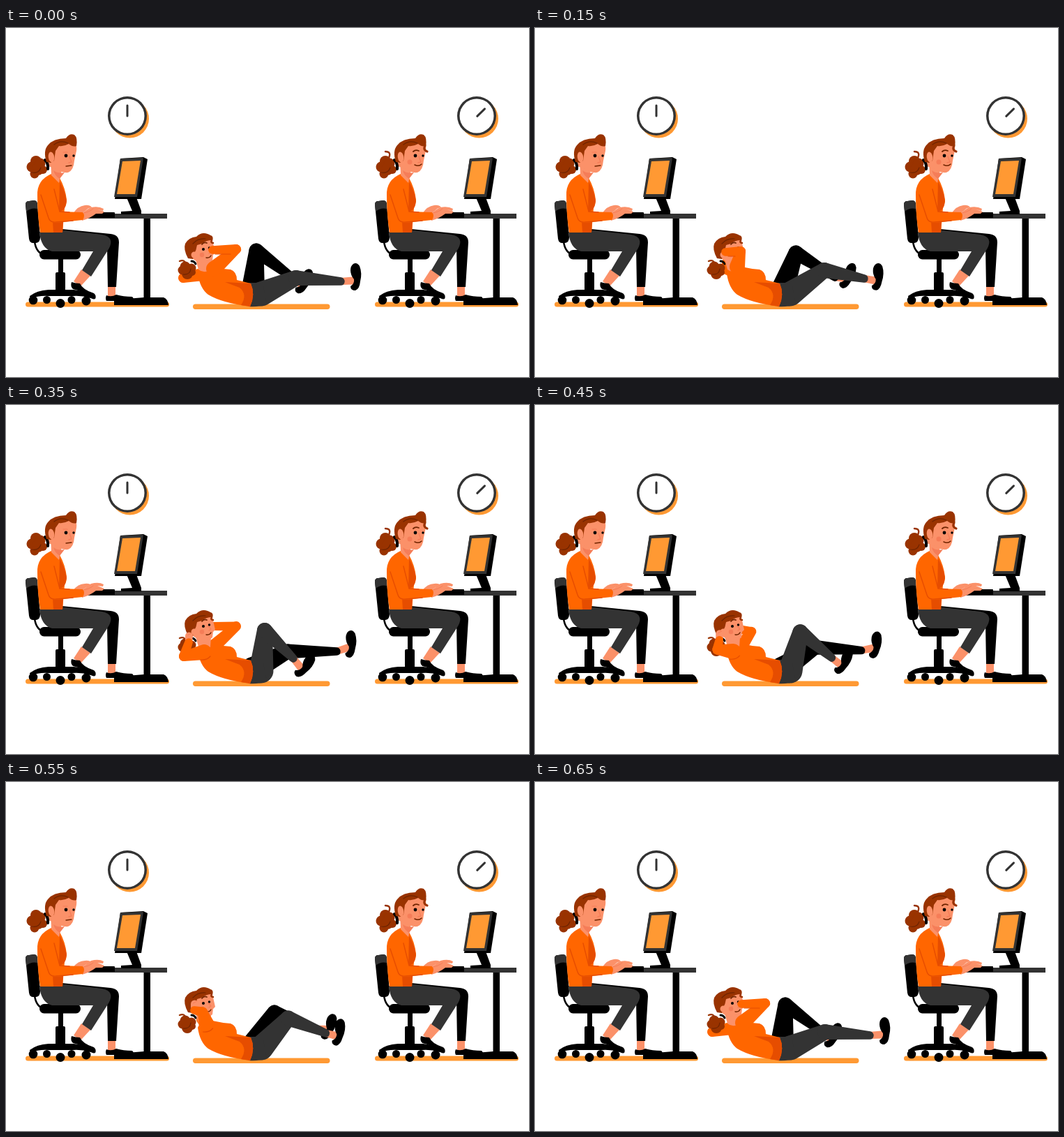
An HTML page with a canvas for the animation above (0.7 s loop, 750 by 500 pixels).

```html
<!DOCTYPE html>
<html lang="en">
<head>
<meta charset="utf-8">
<title>Desk and floor workout</title>
<style>
html, body { margin: 0; width: 100%; height: 100%; overflow: hidden; background: #fff; }
canvas { display: block; }
</style>
</head>
<body>
<canvas id="stage" width="750" height="500"></canvas>
<script>
const ctx = document.getElementById('stage').getContext('2d');
const C = {
  black: '#000', grey: '#333', sun: '#ff9933', top: '#ff6600', shade: '#e64d00',
  skin: '#fb9169', blush: '#f57d58', hair: '#993300', dark: '#6f2400'
};
const LOOP = 700, STEP = 50;

function fill(color, d) {
  ctx.fillStyle = color;
  ctx.fill(new Path2D(d));
}
function line(color, width, d) {
  ctx.strokeStyle = color;
  ctx.lineWidth = width;
  ctx.lineCap = ctx.lineJoin = 'round';
  ctx.stroke(new Path2D(d));
}
function dots(color, list) {
  ctx.fillStyle = color;
  for (const [x, y, r] of list) {
    ctx.beginPath();
    ctx.arc(x, y, r, 0, Math.PI * 2);
    ctx.fill();
  }
}
function bar(color, x, y, w, h, r = 0) {
  ctx.fillStyle = color;
  ctx.beginPath();
  ctx.roundRect(x, y, w, h, r);
  ctx.fill();
}
// tapered capsule between two circles
function limb(color, [ax, ay], ra, [bx, by], rb) {
  const d = Math.hypot(bx - ax, by - ay);
  const ang = Math.atan2(by - ay, bx - ax);
  ctx.fillStyle = color;
  ctx.beginPath();
  if (d <= Math.abs(ra - rb)) {
    ctx.arc(ax, ay, Math.max(ra, rb), 0, Math.PI * 2);
  } else {
    const o = Math.acos((ra - rb) / d);
    ctx.arc(ax, ay, ra, ang + o, ang - o + Math.PI * 2);
    ctx.arc(bx, by, rb, ang - o, ang + o);
  }
  ctx.fill();
}

function clock(angle) {
  dots(C.sun, [[177.5, 130, 27.5]]);
  dots(C.grey, [[174, 126, 28]]);
  dots('#fff', [[174, 126, 24.5]]);
  ctx.save();
  ctx.translate(174, 127);
  ctx.rotate(angle);
  line(C.grey, 3, 'M0 -1V-16');
  ctx.restore();
}

function chair() {
  fill(C.black, 'M28 253Q28 248 33 248L40 247Q45 247 45 253L49 300Q49 307 43 308L39 308Q34 308 33 302Z');
  fill(C.grey, 'M28 253Q28 248 33 248L40 247Q45 247 45 253L45 259Q36 257 29 263Z');
  line(C.black, 2.5, 'M41 306Q43 322 56 326');
  bar(C.black, 48, 318, 59, 13.5, 6.5);
  bar(C.black, 75, 330, 7, 22);
  bar(C.black, 71, 350, 14, 28, 2);
  fill(C.black, 'M34 384Q44 376 61 375L97 375Q115 377 123 384L121 387Q108 383 96 384L61 384Q47 383 35 388Z');
  dots(C.black, [[39, 390, 6.3], [58.5, 389.5, 5.5], [78, 394.5, 6.5], [94, 389.5, 5.5], [115, 391, 6.5]]);
}

function desk() {
  bar(C.grey, 112, 266, 119, 7);
  bar(C.black, 118, 264, 38, 8, 1);
  bar(C.black, 197.5, 273, 9.5, 117);
  fill(C.black, 'M155 397L155 391Q176 387 198 386L226 386Q232 388 233 397Z');
  fill(C.black, 'M173 243L187 243L194 262L194 267L165 267L165 263L181 262Z');
  fill(C.black, 'M164 187L197 185L203 188L194 245L156 245Z');
  fill(C.grey, 'M164 187L197 186L188 242L155 242Z');
  fill(C.sun, 'M167 191L193 190L185 238L159 238Z');
}

function deskHead(lively) {
  fill(C.skin, 'M64 186L80 203L76 222L65 211Z');
  fill(C.blush, 'M68 204Q74 209 84 207L77 216Q70 212 68 204Z');
  fill(C.skin, 'M62 172Q68 163 82 164L99 165Q102 169 101 176L98 190Q97 204 89 207Q80 208 72 202L61 198Z');
  dots(C.hair, [[43, 191, 8], [37, 199, 7.5], [49, 194, 7.5], [46, 202, 9], [41, 209, 6.5], [53, 203, 6]]);
  line(C.dark, 1.2, 'M37 207Q47 209 50 200');
  line(C.black, 4, 'M56 189Q61 194 60 202');
  fill(C.hair, 'M58 192Q53 176 60 168Q68 158 86 158Q91 150 98 153Q103 157 101 169Q96 171 90 166Q83 170 76 169L71 176L69 190L64 193Z');
  line(C.dark, 1.3, 'M69 167Q78 160 89 165');
  ctx.fillStyle = C.skin;
  ctx.beginPath();
  ctx.ellipse(65, 185, 4.2, 7.5, -0.15, 0, Math.PI * 2);
  ctx.fill();
  dots(C.black, [[86, 183, 2.4], [97, 183, 1.7]]);
  line(C.blush, 1.3, 'M91 184L94 192L90 193');
  if (lively) {
    line(C.hair, 2.4, 'M48 186Q52 177 43 177');
    line(C.hair, 3.2, 'M96 164Q102 166 99 171Q98 175 103 177');
    line(C.dark, 1.8, 'M83 177Q86 174 91 176');
    line(C.dark, 1.5, 'M85 196Q91 199 95 195');
    dots(C.blush, [[78, 192, 3.5]]);
  } else {
    line(C.blush, 1.2, 'M82 178L88 178');
    line(C.dark, 1.3, 'M86 198L94 197');
  }
}

function hands(step) {
  const a = [0, 0, 1, 0, 1, 0, 0, 1, 0, 1, 0, 1, 0, 0][step] * 2;
  const b = 2 - a;
  fill(C.skin, `M96 266Q103 ${255 + a / 2} 113 ${254 + a}Q120 ${253 + a} 123 ${257 + a}Q117 ${258 + a} 115 261L106 268Z`);
  fill(C.skin, `M109 276L110 265Q117 259 122 ${256 + b / 2}Q133 ${253 + b} 140 ${257 + b}L139 ${260 + b}L131 ${259 + b / 2}L141 263L138 266L129 266Q120 273 109 276Z`);
  line(C.blush, 1, 'M111 265Q119 264 125 259');
}

function worker(x, lively, angle, step) {
  ctx.save();
  ctx.translate(x, 0);
  bar(C.sun, 28, 392.5, 206, 7, 3.5);
  clock(angle);
  chair();
  desk();
  // far leg
  bar(C.skin, 146, 368, 11, 17);
  fill(C.black, 'M80 288L150 295Q162 296 162 307L158 371L146 371L145 314L90 306Z');
  fill(C.black, 'M144 383Q151 386 158 382Q168 385 181 385Q184 388 183 391L144 391Q142 387 144 383Z');
  // near leg
  fill(C.skin, 'M108 346L121 355L107 370L97 363Z');
  fill(C.black, 'M94 364Q100 366 106 366Q110 375 126 380Q130 383 128 388Q124 390 116 383Q110 377 96 374Q92 370 94 364Z');
  fill(C.grey, 'M48 292L85 290L138 296Q157 300 147 317L122 356L109 347L125 320L66 320Q50 316 48 292Z');
  // torso
  fill(C.top, 'M65 209Q70 214 77 215Q85 229 87 246Q87 253 84 258L81 293L49 293Q45 270 45 240Q44 218 65 209Z');
  fill(C.shade, 'M77 220Q85 234 87 248Q86 255 83 260L76 264Z');
  fill(C.shade, 'M67 277L82 276L81 293L68 293Z');
  deskHead(lively);
  hands(step);
  fill(C.top, 'M50 224Q60 214 68 228L77 263L110 264Q114 269 110 275L72 279Q63 279 61 273L49 243Z');
  line(C.shade, 1.4, 'M50 239L61 272Q63 279 72 278L96 276');
  line(C.shade, 1.4, 'M69 231L77 263L91 264');
  ctx.restore();
}

// Each track holds four key poses of the crunch.
const POSE = {
  kneeN: [[416, 358], [415, 347], [392, 328], [371, 323]],
  ankN: [[480, 363], [472, 359], [442, 361], [412, 363]],
  shoeN: [[502, 356, 0], [492, 356, .08], [461, 361, .32], [430, 374, .68]],
  kneeF: [[359, 319], [374, 322], [398, 340], [404, 353]],
  ankF: [[414, 360], [430, 357], [460, 350], [474, 353]],
  shoeF: [[429, 363, .48], [450, 355, .42], [482, 345, .3], [495, 342, .04]],
  shoulder: [[298, 345], [290, 342], [285, 352], [284, 354]],
  elbow: [[330, 317], [295, 320], [269, 339], [255, 360]],
  hand: [[296, 318], [273, 321], [267, 333], [262, 340]],
  elbowF: [[254, 358], [274, 346], [286, 334], [330, 317]],
  handF: [[262, 352], [274, 336], [286, 326], [298, 317]]
};
const LEGS = [0, 0, .12, 1, 1.45, 2, 2.55, 3, 2.96, 2.55, 2, 1.45, 1, 0];
const ARMS = [0, 0, .4, 1, 1.5, 2, 2.55, 3, 2.96, 2.55, 2, 1.5, .78, 0];

function at(name, p) {
  const keys = POSE[name];
  const i = Math.min(2, Math.floor(p));
  return keys[i].map((v, k) => v + (keys[i + 1][k] - v) * (p - i));
}

function shoe([x, y, tilt], ankle) {
  const heel = [x - 5 * Math.cos(tilt) - 6 * Math.sin(tilt), y - 5 * Math.sin(tilt) + 6 * Math.cos(tilt)];
  limb(C.skin, ankle, 5, heel, 5.5);
  ctx.save();
  ctx.translate(x, y);
  ctx.rotate(tilt);
  fill(C.black, 'M-4 -18Q1 -21 5 -15Q9 -5 6 7Q5 18 -1 20Q-8 20 -8 14Q-2 10 -3 4Q-8 -2 -8 -9Q-8 -15 -4 -18Z');
  ctx.restore();
}

function leg(color, hip, r, knee, rk, ankle, foot) {
  shoe(foot, ankle);
  limb(color, hip, r, knee, rk);
  limb(color, knee, rk, ankle, 5.7);
}

function floorHead() {
  line(C.hair, 2.4, 'M258 338Q256 331 249 334');
  dots(C.hair, [[257, 342, 7.5], [253, 347, 6.5], [260, 352, 8], [266, 344, 6.5], [267, 350, 5]]);
  line(C.dark, 1.2, 'M254 353Q264 354 265 345');
  line(C.black, 3, 'M266 334Q270 334 272 338');
  fill(C.skin, 'M270 325L294 333L293 347Q283 352 276 346Z');
  fill(C.skin, 'M265 311Q274 302 296 304L298 313L300 322L297 325L296 333Q291 338 282 337Q272 335 266 329Z');
  fill(C.hair, 'M261 330Q254 317 257 309Q262 300 273 299Q280 292 289 295Q295 296 295 304Q287 304 281 309L274 311Q273 318 270 323L268 331Z');
  line(C.hair, 2.5, 'M289 298Q297 297 295 304Q293 308 297 308');
  line(C.dark, 1.2, 'M268 309Q275 301 286 302');
  dots(C.blush, [[281, 325, 3.2]]);
  line(C.dark, 1.7, 'M281 310Q284 306 288 308');
  dots(C.black, [[283, 317, 2], [291.5, 315, 1.7]]);
  line(C.blush, 1.2, 'M289 316L294 321L291 323');
  line(C.dark, 1.4, 'M287 329Q292 330 294 326');
  dots(C.skin, [[270, 325, 4.5]]);
}

function crunch(step) {
  const p = LEGS[step], q = ARMS[step];
  bar(C.sun, 268, 395.5, 196.5, 7.5, 3.7);

  const far = at('elbowF', q);
  limb(C.top, [292, 351], 10, far, 7);
  limb(C.top, far, 6.5, at('handF', q), 6);

  leg(C.black, [354, 378], 17, at('kneeF', p), 10.5, at('ankF', p), at('shoeF', p));
  leg(C.grey, [366, 381], 17.5, at('kneeN', p), 11, at('ankN', p), at('shoeN', p));
  fill(C.grey, 'M348 365L368 365L374 396Q362 400 348 399Z');

  fill(C.top, 'M275 352Q279 341 296 342Q309 345 322 346Q331 349 331 361L351 366Q358 382 350 399Q310 394 290 382Q278 373 275 352Z');
  fill(C.shade, 'M314 364L351 366Q358 382 350 399L337 397Q347 382 335 372Z');
  floorHead();

  const sh = at('shoulder', q), el = at('elbow', q), hand = at('hand', q);
  if (q > 1.3) {
    const tip = [hand[0] + .5, hand[1] - 9];
    limb(C.skin, hand, 5, tip, 5.5);
    line(C.blush, 1, `M${tip[0] - 2} ${tip[1] - 1}l5 -3`);
  }
  limb(C.top, sh, 11, el, 7);
  limb(C.top, el, 7, hand, 5.8);
  if (q < 1.4) {
    line(C.shade, 1.2, `M${hand[0] + 4} ${hand[1] + 6}L${el[0] - 8} ${el[1] + 7}`);
  } else {
    line(C.shade, 1.2, `M${sh[0] + 9} ${sh[1] + 6}Q${sh[0] + 4} ${sh[1] + 12} ${sh[0] - 5} ${sh[1] + 11}`);
  }
}

function draw(time) {
  const step = Math.floor((time % LOOP) / STEP);
  ctx.fillStyle = '#fff';
  ctx.fillRect(0, 0, 750, 500);
  worker(0, false, 0, step);
  worker(501, true, .8, step);
  crunch(step);
}

const start = performance.now();
function tick() {
  draw(performance.now() - start);
  requestAnimationFrame(tick);
}
tick();
</script>
</body>
</html>
```
